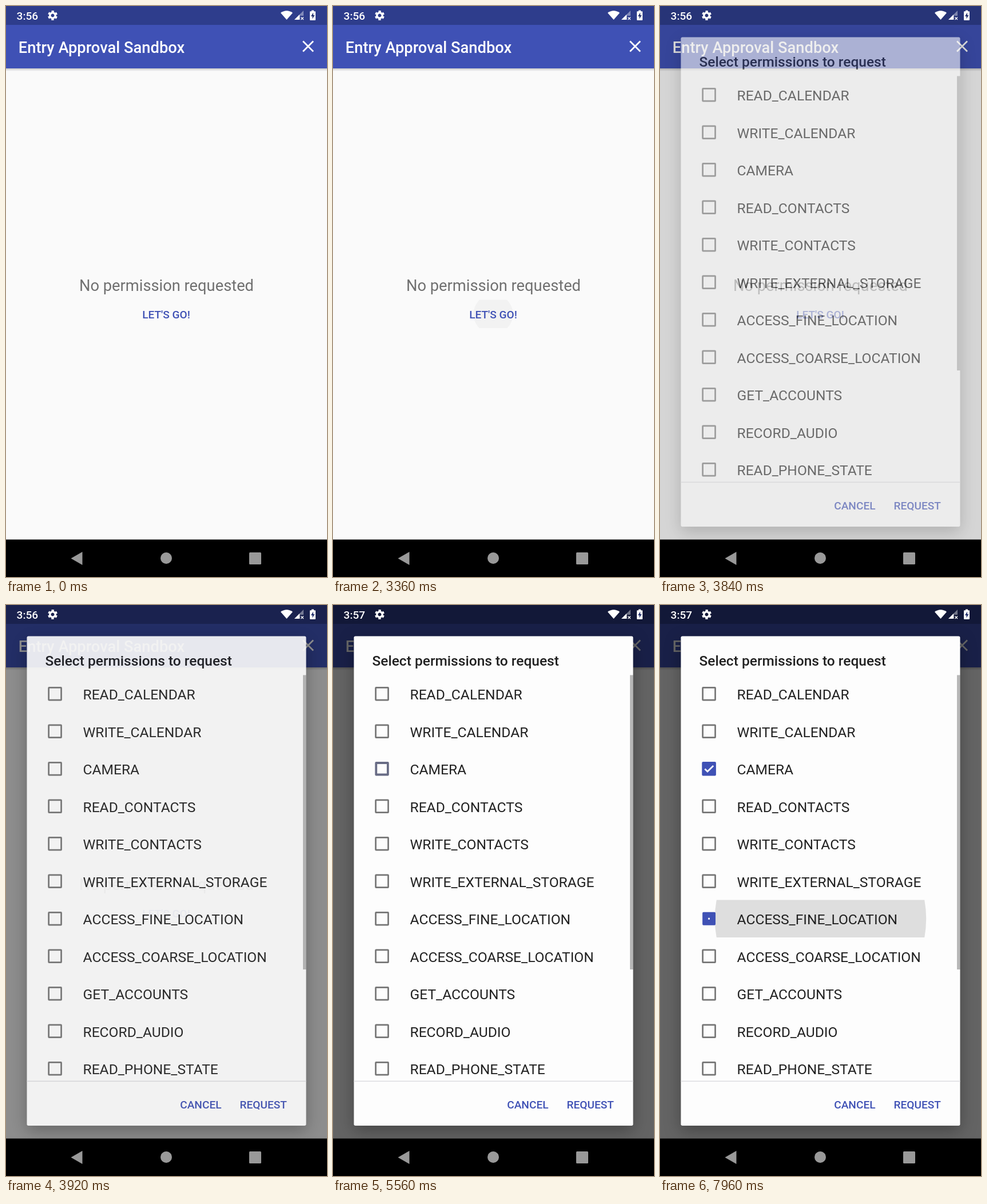
Recreate the animation shown at these times as an HTML page. Size 561 by 998 pixels, loop 8000 ms.

```html
<!DOCTYPE html>
<html lang="en">
<head>
<meta charset="utf-8">
<title>Permission dialog</title>
<style>
html, body { margin: 0; width: 100%; height: 100%; overflow: hidden; background: #000; }
svg { display: block; width: 100%; height: 100%; }
text { font-family: Roboto, "Noto Sans", sans-serif; font-weight: 400; white-space: pre; }
.med { font-weight: 500; }
.btn { font-size: 19.1px; font-weight: 500; fill: #3f51b5; }
.item { font-size: 24.58px; fill: #212121; }
#dialog .card { filter: drop-shadow(0 9px 14px rgba(0, 0, 0, .3)); }
</style>
</head>
<body>
<svg viewBox="0 0 561 998" xmlns="http://www.w3.org/2000/svg">
  <defs>
    <linearGradient id="fade" x2="0" y2="1">
      <stop stop-opacity=".2"/><stop offset="1" stop-opacity="0"/>
    </linearGradient>
    <clipPath id="btnClip"><rect x="225" y="513.5" width="110" height="49.5" rx="2.7"/></clipPath>
    <clipPath id="rowClip"><rect id="rowBox" x="36.5" width="488" height="65.5"/></clipPath>
  </defs>

  <!-- main screen -->
  <rect y="109" width="561" height="824" fill="#fafafa"/>
  <rect width="561" height="33" fill="#2e3d8c"/>
  <rect y="33" width="561" height="76" fill="#3f51b5"/>
  <rect y="109" width="561" height="5" fill="url(#fade)"/>
  <text class="med" x="21.8" y="81.7" font-size="27.3" fill="#fff">Entry Approval Sandbox</text>
  <path d="M519 61.5l18 18m0-18l-18 18" stroke="#fff" stroke-width="2.7"/>
  <text x="280.5" y="498" font-size="27.3" fill="#707070" text-anchor="middle">No permission requested</text>
  <g clip-path="url(#btnClip)"><circle id="btnRipple" cx="280" cy="538.5"/></g>
  <text class="btn" x="280" y="545.8" text-anchor="middle">LET'S GO!</text>

  <rect id="dim" width="561" height="933"/>

  <g id="dialog">
    <rect class="card" x="36.5" y="54.5" width="488" height="855.5" rx="2.7" fill="#fdfdfd"/>
    <g clip-path="url(#rowClip)"><circle id="rowRipple" cx="280.5"/></g>
    <text class="med" x="68.5" y="105.5" font-size="24.5" fill="#212121">Select permissions to request</text>
    <g id="list"></g>
    <rect id="bar" x="519" y="122.5" width="5.5" height="514.5" fill-opacity=".28"/>
    <rect x="36.5" y="831.6" width="488" height="1.5" fill="#dcdce0"/>
    <text class="btn" x="304.2" y="879.5">CANCEL</text>
    <text class="btn" x="408.6" y="879.5">REQUEST</text>
  </g>

  <!-- system bars -->
  <g fill="#fff">
    <text id="clock" class="med" x="18.6" y="24" font-size="19.1"></text>
    <g transform="translate(81.5 16.5)" fill="none" stroke="#fff">
      <circle r="4.7" stroke-width="3.4"/>
      <circle r="7" stroke-width="3" stroke-dasharray="4 3.33" transform="rotate(13.6)"/>
    </g>
    <path d="M490.5 24L480 12Q490.5 4.5 501 12Z"/>
    <path d="M504 24L520 8V17H514V24Z" fill-opacity=".4"/>
    <path d="M504 24L513 15V24Z"/>
    <path d="M515.5 19.5l4.5 4.5m0-4.5l-4.5 4.5" stroke="#fff" stroke-width="1.3"/>
    <path d="M534 9.3V7.6h4v1.7h2q1 0 1 1V24q0 1-1 1h-8q-1 0-1-1V10.300q0-1 1-1z"/>
    <path d="M537 11.500l-4 6.500h2.500v4.500l4-6.500h-2.500z" fill="#26336f"/>
  </g>
  <rect y="932.5" width="561" height="65.500"/>
  <g fill="#999">
    <path d="M113.500 965.500L133.500 954V977Z"/>
    <circle cx="280" cy="965" r="10"/>
    <rect x="425" y="955" width="21" height="21" rx="1.500"/>
  </g>
</svg>
<script>
const LOOP = 8000, STEP = 40, ROW = 65.5, TOP = 122.5;
const CAMERA = 2, LOCATION = 6;
const names = ['READ_CALENDAR', 'WRITE_CALENDAR', 'CAMERA', 'READ_CONTACTS',
  'WRITE_CONTACTS', 'WRITE_EXTERNAL_STORAGE', 'ACCESS_FINE_LOCATION',
  'ACCESS_COARSE_LOCATION', 'GET_ACCOUNTS', 'RECORD_AUDIO', 'READ_PHONE_STATE'];

// [time, value] steps, joined by straight lines
const dialogFade = [[3680, 0], [3720, .07], [3760, .22], [3800, .42], [3840, .59],
  [3880, .77], [3920, .9], [3960, .97], [4000, 1]];
const dimFade = [[3760, 0], [3800, .05], [3840, .15], [3880, .3], [3920, .44],
  [3960, .55], [4000, .6]];
const btnAlpha = [[3340, 0], [3420, .12], [3680, .12], [3760, .06], [3840, 0]];
const barAlpha = [[7080, 1], [7360, 0], [7800, 0], [7840, 1]];
const cameraTap = 5540, locationTap = 7820;
const rippleAlpha = [[65, 0], [135, .12], [300, .12], [540, 0]];
const boxScale = [[0, 1], [140, .93], [170, .92], [333, 1]];

const $ = id => document.getElementById(id);
const clamp = x => Math.min(1, Math.max(0, x));
const smooth = x => x * x * (3 - 2 * x);
const mix = (a, b, k) => a + (b - a) * k;

function at(steps, t) {
  if (t <= steps[0][0]) return steps[0][1];
  for (let i = 1; i < steps.length; i++) {
    const [t0, a] = steps[i - 1], [t1, b] = steps[i];
    if (t <= t1) return mix(a, b, (t - t0) / (t1 - t0));
  }
  return steps[steps.length - 1][1];
}

function set(el, attrs) {
  for (const key in attrs) el.setAttribute(key, attrs[key]);
}

$('list').innerHTML = names.map((name, i) => {
  const y = TOP + ROW * (i + .5);
  return `<g transform="translate(85.6 ${y})"><g>
    <path fill-rule="evenodd"/><path fill="none" stroke="#fff" stroke-width="2.7"/></g></g>
    <text class="item" x="134.500" y="${y + 9.8}">${name}</text>`;
}).join('');
const boxes = [...document.querySelectorAll('#list > g > g')];

function hole(size) {
  const h = size / 2;
  return `M${-h} ${-h}V${h}H${h}V${-h}Z`;
}

function drawBox(box, dt) {
  const [frame, tick] = box.children;
  const color = clamp(dt / 80), k = smooth(clamp((dt - 166) / 167));
  const rgb = [[117, 63], [117, 81], [117, 181]].map(([a, b]) => Math.round(mix(a, b, color)));
  const outer = 'M-10.3-12.3H10.3q2 0 2 2V10.3q0 2-2 2H-10.3q-2 0-2-2V-10.3q0-2 2-2Z';
  set(box, { transform: `scale(${at(boxScale, dt)})` });
  set(frame, { d: outer + hole(19.2 * (1 - clamp(dt / 166))), fill: `rgb(${rgb})` });
  set(tick, {
    d: `M${-7.2 * k} ${.2 * k}L${-2.6 * k} ${4.8 * k}L${7.6 * k} ${-5.2 * k}`,
    visibility: k > 0 ? 'inherit' : 'hidden'
  });
}
boxes.forEach(box => drawBox(box, -1));

function draw(t) {
  set($('clock'), {}).textContent;
}

function render(t) {
  $('clock').textContent = t < 3960 ? '3:56' : '3:57';
  set($('dialog'), { opacity: at(dialogFade, t) });
  set($('dim'), { opacity: at(dimFade, t) });
  set($('bar'), { opacity: at(barAlpha, t) });
  set($('btnRipple'), {
    r: mix(33, 62, smooth(clamp((t - 3340) / 140))),
    opacity: at(btnAlpha, t)
  });

  const second = t >= locationTap;
  const row = second ? LOCATION : CAMERA;
  const dt = t - (second ? locationTap : cameraTap);
  set($('rowBox'), { y: TOP + ROW * row });
  set($('rowRipple'), {
    cy: TOP + ROW * (row + .5),
    r: mix(147, 248, smooth(clamp((dt - 55) / 205))),
    opacity: at(rippleAlpha, dt)
  });
  drawBox(boxes[CAMERA], t - cameraTap);
  drawBox(boxes[LOCATION], t - locationTap);
}

const start = performance.now();
function tick(now) {
  const t = Math.max(0, now - start) % LOOP;
  render(Math.floor(t / STEP) * STEP);
  requestAnimationFrame(tick);
}
render(0);
requestAnimationFrame(tick);
</script>
</body>
</html>
```
